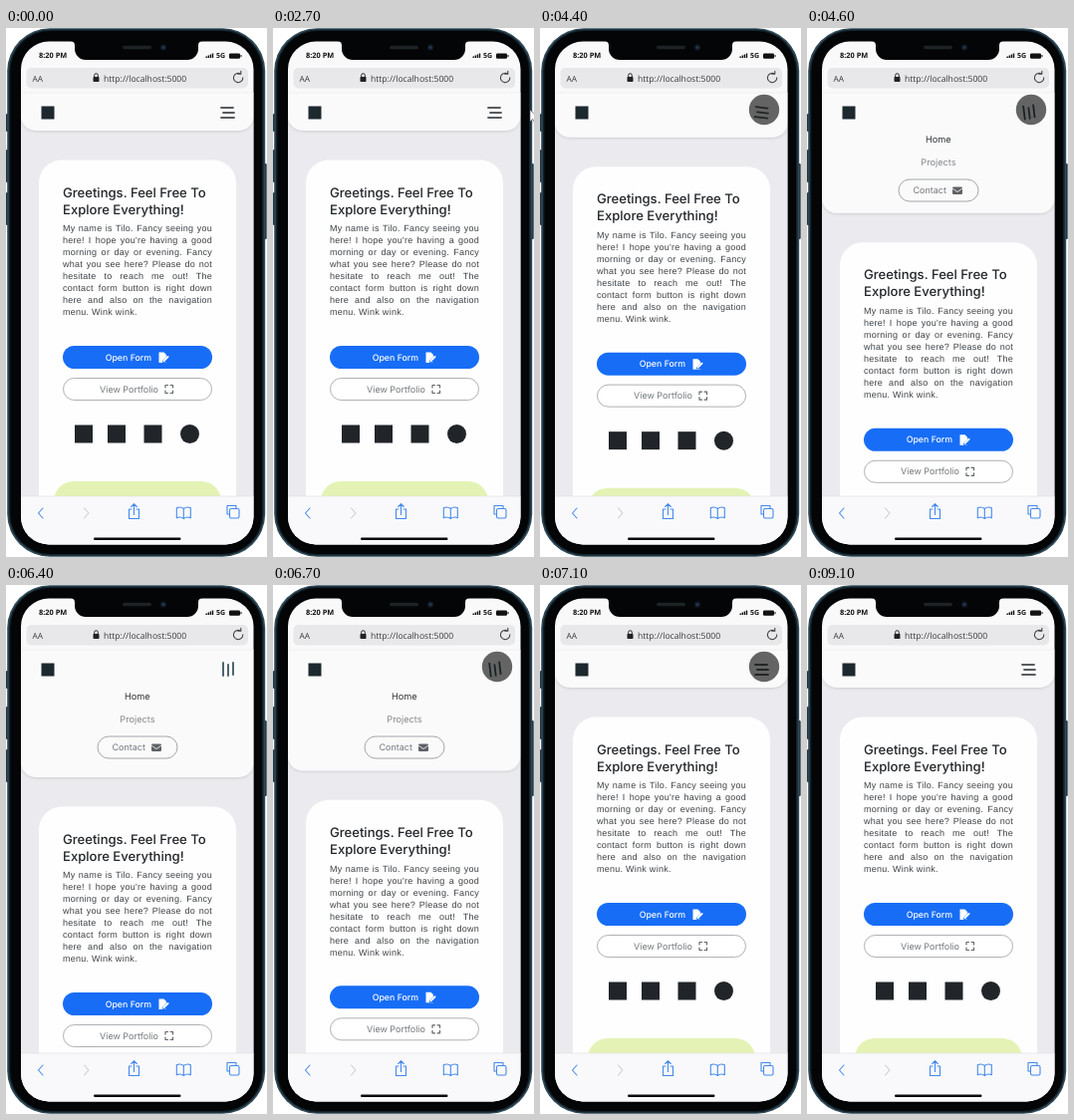
Recreate the animation shown at these times as an HTML page. Size 262x531 px, loop 9700 ms.

```html
<!DOCTYPE html>
<html lang="en">
<head>
<meta charset="utf-8">
<title>Phone menu demo</title>
<style>
  html, body { margin: 0; width: 100%; height: 100%; overflow: hidden; background: #fff; }
  svg { display: block; width: 100vw; height: 100vh; text-rendering: geometricPrecision; }
  text { font-family: Inter, sans-serif; font-size: 9px; }
  .status { font: bold 7.4px "Open Sans", sans-serif; fill: #111; }
  .url { font: 8.6px "Open Sans", sans-serif; fill: #3a3a3c; }
  .title { font-size: 13.15px; font-weight: 500; letter-spacing: -.04px; fill: #212529; }
  .copy text { font-family: "Liberation Sans", Arial, sans-serif; letter-spacing: .26px; fill: #3d4145; }
  .item { font-size: 9.2px; text-anchor: middle; }
  .line { fill: none; stroke-linecap: round; stroke-linejoin: round; }
</style>
</head>
<body>
<svg viewBox="0 0 262 531">
  <defs>
    <clipPath id="screenClip"><rect x="15" y="13.5" width="233.5" height="505" rx="28"/></clipPath>
    <clipPath id="pageClip"><rect x="15" y="65" width="233.5" height="405"/></clipPath>
    <clipPath id="menuClip"><rect id="menuBox" x="15" y="95" width="233.5" height="0"/></clipPath>
    <filter id="soft" x="-10%" y="-20%" width="120%" height="150%">
      <feDropShadow dx="0" dy="1" stdDeviation="1.6" flood-color="#000" flood-opacity=".13"/>
    </filter>
  </defs>

  <!-- phone body -->
  <g fill="#22363f">
    <rect x="0" y="86" width="3" height="18" rx="1"/>
    <rect x="0" y="122" width="3" height="33" rx="1"/>
    <rect x="0" y="165" width="3" height="33" rx="1"/>
    <rect x="258.5" y="136" width="3.2" height="76" rx="1"/>
  </g>
  <rect x="1.2" y=".2" width="259" height="530.6" rx="43" fill="#2f4957"/>
  <rect x="2.8" y="1.6" width="255.8" height="527.8" rx="42" fill="#12212a"/>
  <rect x="4.4" y="3" width="252.6" height="525" rx="40" fill="#040506"/>

  <g clip-path="url(#screenClip)">
    <rect x="15" y="13" width="234" height="506" fill="#f9f9fa"/>

    <g clip-path="url(#pageClip)">
      <rect x="15" y="65" width="234" height="406" fill="#ebebef"/>
      <g id="content">
        <rect x="33" y="132.5" width="198" height="420" rx="23" fill="#fefefe"/>
        <text class="title" x="57" y="169.5">Greetings. Feel Free To</text>
        <text class="title" x="57" y="186.5">Explore Everything!</text>
        <g class="copy" id="copy"></g>

        <rect x="57" y="319" width="150" height="23" rx="11.5" fill="#176df6"/>
        <text x="99.7" y="333.6" font-weight="500" style="font-size:8.8px" fill="#fff">Open Form</text>
        <path d="M153.5 325.5h5l2.5 2.5v2l-4 4v1.7h4v.3h-7.5z" fill="#fff"/>
        <path class="line" d="M158.5 334l4-4" stroke="#fff" stroke-width="2"/>

        <rect x="57.5" y="351.5" width="149" height="22" rx="11" fill="#fff" stroke="#aeb1b4"/>
        <text x="94" y="365.6" fill="#74787c">View Portfolio</text>
        <path class="line" d="M160 361v-2.500h2.500M165 358.500h2.500v2.500M167.500 364v2.500h-2.500M162.500 366.500h-2.500v-2.500" stroke="#64686c" stroke-width="1.200"/>

        <g fill="#212529">
          <rect x="69" y="398.5" width="18" height="18"/>
          <rect x="102" y="398.5" width="18" height="18"/>
          <rect x="138.5" y="398.5" width="18" height="18"/>
          <circle cx="184.5" cy="407.5" r="9.5"/>
        </g>
        <rect x="48" y="455" width="168" height="90" rx="20" fill="#e4f3b5"/>
      </g>

      <rect id="nav" x="15" y="40" width="233.5" height="63" rx="15" fill="#fafafb" filter="url(#soft)"/>
      <rect x="35.5" y="78.5" width="13" height="13" fill="#1d292f"/>
      <g clip-path="url(#menuClip)">
        <text class="item" x="131.8" y="114.8" fill="#303437">Home</text>
        <text class="item" x="132" y="138.3" fill="#85888b">Projects</text>
        <rect x="92" y="152" width="80" height="22" rx="11" fill="none" stroke="#a4a7aa"/>
        <text x="106.5" y="166.3" fill="#74787c">Contact</text>
        <rect x="146" y="159.5" width="10" height="7.5" rx="1.2" fill="#5e6266"/>
        <path class="line" d="M146.3 161.3l4.7 3.2 4.7-3.2" stroke="#fafafb" stroke-width=".8"/>
      </g>
      <path id="burger" class="line" d="M216 80H228M218 85H229M216 90H229" stroke-width="1.8"/>
    </g>

    <!-- browser chrome -->
    <rect x="15" y="64.8" width="234" height=".5" fill="#e6e6e9"/>
    <rect x="20.5" y="40" width="222.5" height="20.5" rx="5" fill="#e8e8eb"/>
    <text class="url" x="26.5" y="53.5" style="font-size:8.3px">AA</text>
    <rect x="87.5" y="49" width="6" height="5" rx=".8" fill="#222"/>
    <path class="line" d="M88.7 49v-1.5a1.8 1.8 0 0 1 3.6 0V49" stroke="#222" stroke-width="1"/>
    <text class="url" x="98" y="53.5">http://localhost:5000</text>
    <path class="line" d="M237.8 49.8a4.7 4.7 0 1 1-2.6-4M235.8 43.2v3h-3" stroke="#444" stroke-width="1.1"/>

    <text class="status" x="33" y="29.8">8:20 PM</text>
    <path d="M200.5 30v-1.5h1.4V30zM202.6 30v-2.5h1.4V30zM204.7 30v-3.5h1.4V30zM206.8 30v-4.5h1.4V30z" fill="#111"/>
    <text class="status" x="211" y="30" style="font-size:7px">5G</text>
    <rect x="224" y="25.5" width="11" height="5.2" rx="1.3" fill="#111"/>
    <rect x="235.5" y="27" width="1" height="2.2" fill="#111"/>

    <rect x="15" y="470" width="234" height="49" fill="#f9f9fb"/>
    <rect x="15" y="469.7" width="234" height=".6" fill="#dcdce0"/>
    <g class="line" stroke="#4489ec" stroke-width="1.1">
      <path d="M37 482l-4.5 5 4.5 5"/>
      <path d="M78.5 482l4.5 5-4.5 5" stroke="#cbccd0"/>
      <path d="M126 483h-2.5v9.500h10V483h-2.500M128.500 488.500v-10.500M125.700 480.500l2.800-2.800 2.800 2.800"/>
      <path d="M178.3 482.5c-2-1.600-5-1.700-7-.8v10c2-.9 5-.8 7 .8 2-1.600 5-1.700 7-.8v-10c-2-.9-5-.8-7 .8v10"/>
      <path d="M224 488h-2v-8.5h9v2.5"/>
      <rect x="224.5" y="482.5" width="9.5" height="9.5" rx="1.5"/>
    </g>
    <rect x="88" y="511.6" width="87.500" height="2.500" rx="1.250" fill="#0a0a0a"/>
  </g>

  <!-- notch -->
  <path d="M64 13h134c-3.500 0-5 1.500-5 4.500v3.500a11 11 0 0 1-11 11H80a11 11 0 0 1-11-11v-3.500c0-3-1.500-4.500-5-4.500z" fill="#040506"/>
  <rect x="117" y="17.8" width="29" height="3.4" rx="1.7" fill="#1d2225"/>
  <circle cx="158" cy="19.5" r="3.2" fill="#10171f"/>
  <circle cx="158" cy="19.5" r="1.5" fill="#23395a"/>

  <g id="pointer">
    <circle id="touch" r="15.2" fill="rgba(0,0,0,.6)"/>
    <path id="arrow" d="M0 0v12l2.800-2.600 1.900 4.300 2-.9-1.900-4.200h3.900z" fill="#fff" stroke="#222" stroke-width=".5"/>
  </g>
</svg>
<script>
const LOOP = 9700, STEP = 100, MENU_H = 90, COPY_W = 150;
const OPEN_AT = 4370, CLOSE_AT = 6670, SLIDE = 350;
const $ = id => document.getElementById(id);
const clamp = v => Math.min(1, Math.max(0, v));
const mix = (a, b, p) => a + (b - a) * p;

const lines = [
  "My name is Tilo. Fancy seeing you",
  "here! I hope you're having a good",
  "morning or day or evening. Fancy",
  "what you see here? Please do not",
  "hesitate to reach me out! The",
  "contact form button is right down",
  "here and also on the navigation",
  "menu. Wink wink."
];

// Justify every line but the last by sharing out the spare width.
lines.forEach((line, i) => {
  const el = document.createElementNS("http://www.w3.org/2000/svg", "text");
  el.setAttribute("x", 57);
  el.setAttribute("y", 204.3 + i * 12);
  el.textContent = line;
  $("copy").append(el);
  if (i < lines.length - 1) {
    const gaps = line.split(" ").length - 1;
    el.style.wordSpacing = (COPY_W - el.getComputedTextLength()) / gaps + "px";
  }
});

// CSS "ease": cubic-bezier(.25, .1, .25, 1)
function ease(x) {
  if (x <= 0 || x >= 1) return clamp(x);
  const curve = (a, b, u) => 3 * a * u * (1 - u) ** 2 + 3 * b * u * u * (1 - u) + u ** 3;
  let lo = 0, hi = 1;
  for (let i = 0; i < 24; i++) {
    const u = (lo + hi) / 2;
    if (curve(.25, .25, u) < x) lo = u; else hi = u;
  }
  return curve(.1, 1, lo);
}

const menuOpen = t => ease((t - OPEN_AT) / SLIDE) - ease((t - CLOSE_AT) / SLIDE);

// The pointer is hidden while a finger is down, just before each tap lands.
const pressed = (t, tap) => t >= tap - 270 && t < tap - 70;

function pointerX(t) {
  const enter = clamp((t - 2700) / 300), leave = clamp((t - 8600) / 500);
  return 225 + 33 * (1 - enter) ** 2 + 40 * leave ** 1.5;
}

function draw(t) {
  const p = menuOpen(t), drop = MENU_H * p;
  $("content").setAttribute("transform", `translate(0 ${drop})`);
  $("nav").setAttribute("height", 63 + drop);
  $("menuBox").setAttribute("height", drop);
  $("burger").setAttribute("transform", `rotate(${90 * p} 223 85)`);
  const shade = [[88, 60], [92, 86], [95, 96]].map(([a, b]) => Math.round(mix(a, b, p)));
  $("burger").setAttribute("stroke", `rgb(${shade})`);

  const x = pointerX(t), inside = x < 246;
  const shown = t >= 2700 && t < 9100 && !pressed(t, OPEN_AT) && !pressed(t, CLOSE_AT);
  $("pointer").setAttribute("transform", `translate(${x} 82)`);
  $("pointer").setAttribute("visibility", shown ? "visible" : "hidden");
  $("touch").style.display = inside ? "" : "none";
  $("arrow").style.display = inside ? "none" : "";
}

const start = performance.now();
function tick() {
  const t = (performance.now() - start) % LOOP;
  draw(Math.floor(t / STEP) * STEP);
  requestAnimationFrame(tick);
}
tick();
</script>
</body>
</html>
```
